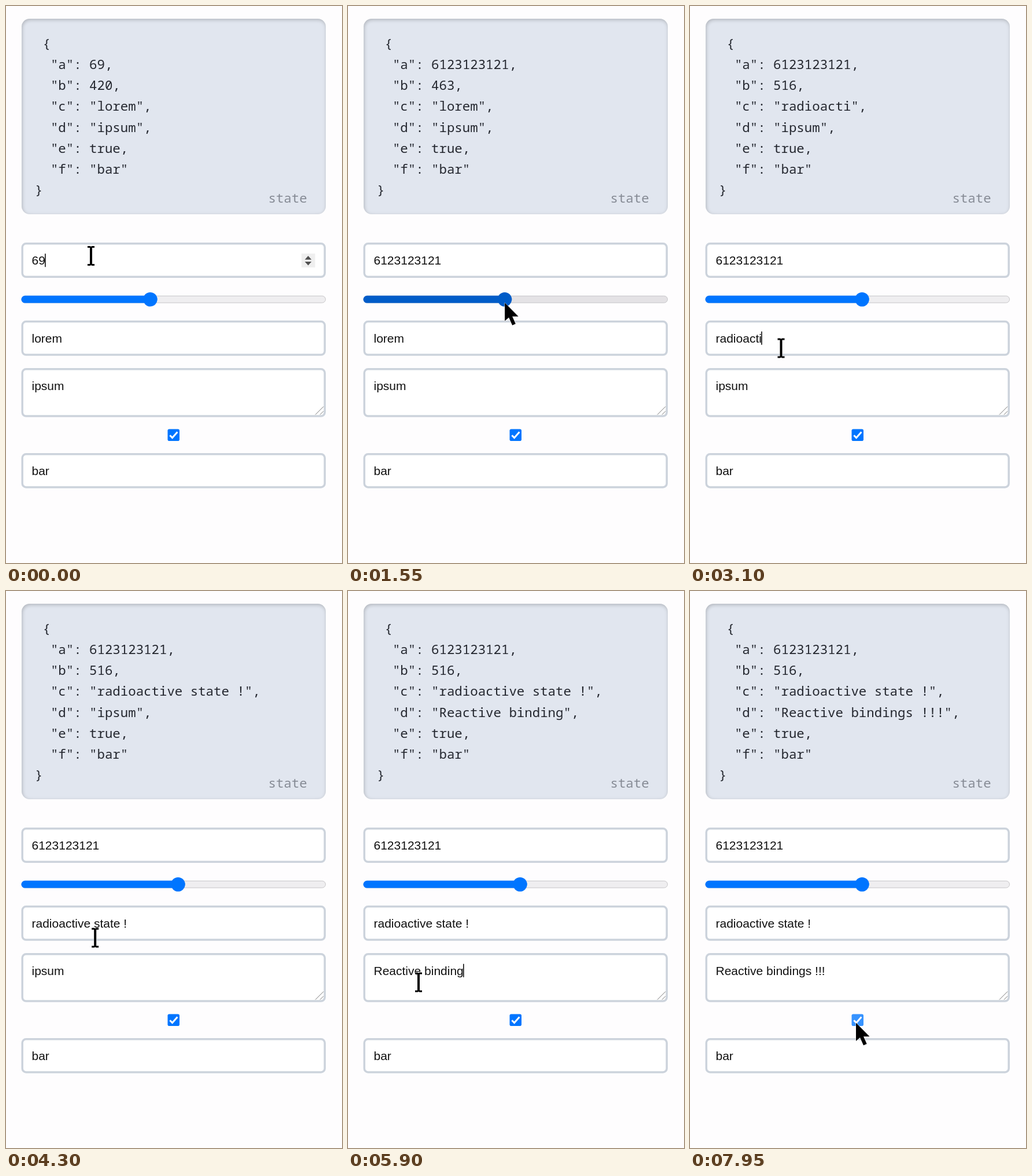
An HTML page for the animation above (8 s loop, 581 by 963 pixels).

```html
<!DOCTYPE html>
<html lang="en">
<head>
<meta charset="utf-8">
<title>Reactive form state</title>
<style>
  html, body { margin: 0; width: 100%; height: 100%; overflow: hidden; background: #fefdfe; }
  #panel {
    position: absolute; left: 26.5px; top: 22px; width: 526.5px; height: 338px;
    border-radius: 14px; background: #e1e6ef;
    box-shadow: inset 1px 2px 6px rgba(0, 0, 0, .22);
  }
  svg { position: absolute; left: 0; top: 0; width: 581px; height: 963px; }
  text { white-space: pre; }
  .code text { font: 22.4px "Noto Sans Mono", "Liberation Mono", monospace; fill: #24272f; }
  .code .label { fill: #868b95; }
  .value text { font: 21px "Liberation Sans", Arial, sans-serif; fill: #111; }
  .box { fill: #fff; stroke: #ccd3dc; stroke-width: 3.5; }
  .cursor { fill: #000; stroke: #fff; stroke-width: 1; paint-order: stroke; }
</style>
</head>
<body>
<div id="panel"></div>
<svg id="stage" viewBox="0 0 581 963">
  <g class="code" id="code"><text class="label" x="453.5" y="340">state</text></g>
  <g id="boxes"></g>
  <g id="spinner">
    <rect x="511" y="428" width="23.5" height="24" fill="#efefef"/>
    <path d="M522.5 432l5.8 6.5h-11.6zM522.5 448.5l5.8-6.5h-11.6z" fill="#505050"/>
  </g>
  <path d="M535 706.5L549 692.5M543 706.5L549 700.5" stroke="#777" fill="none"/>
  <rect id="track" x="27" y="501.3" width="525.5" height="11.8" rx="5.9" stroke="#c6c5c8"/>
  <rect id="filled" x="26.5" y="500.8" height="12.8" rx="6.4"/>
  <circle id="thumb" cy="507.2" r="12.3"/>
  <rect id="check" x="279.5" y="731.5" width="20.5" height="20.5" rx="2.8"/>
  <path d="M283.4 742.3L287.6 746.6L296.4 736.6" fill="none" stroke="#fff" stroke-width="3"/>
  <g class="value" id="values"></g>
  <rect id="caret" width="1.5" height="23" fill="#000"/>
  <path id="arrow" class="cursor" d="M0 0V31.5L7 25.5L13 39L18.7 36.5L13 23.8H23.5Z"/>
  <path id="beam" class="cursor" d="M-6-17h4.5l1.5 1 1.5-1H6v3H2V14H6v3H1.5L0 16l-1.5 1H-6v-3h4V-14h-4z"/>
</svg>
<script>
const LOOP = 8000;
const TEXT_X = 44.5;
const BLUE = '#0075ff', DARK_BLUE = '#005cc8', PRESSED_BLUE = '#3793ff';
const PRESS = 1250, RELEASE = 2060, CHECK_PRESS = 7900;

const $ = id => document.getElementById(id);
const set = (el, attrs) => { for (const k in attrs) el.setAttribute(k, attrs[k]); };
const show = (el, on) => el.setAttribute('visibility', on ? 'visible' : 'hidden');
function add(parent, tag, attrs) {
  const el = document.createElementNS('http://www.w3.org/2000/svg', tag);
  set(el, attrs);
  return parent.appendChild(el);
}

// Input boxes: outline and text baseline
const fields = {
  a: { y: 410.8, h: 57.5, base: 447 },
  c: { y: 545.6, h: 57.5, base: 581.5 },
  d: { y: 627.8, h: 81.3, base: 663.5 },
  f: { y: 774.8, h: 57.2, base: 811 }
};
for (const f of Object.values(fields)) {
  add($('boxes'), 'rect', { class: 'box', x: 28.2, y: f.y, width: 523, height: f.h, rx: 6.5 });
  f.text = add($('values'), 'text', { x: TEXT_X, y: f.base });
}

const lines = ['{', 'a', 'b', 'c', 'd', 'e', 'f', '}'].map((key, i) => {
  const column = key === '{' ? 1 : key === '}' ? 0 : 2;
  const el = add($('code'), 'text', { x: 50 + column * 13.44, y: 73 + i * 36.15 });
  el.textContent = key;
  return { key, el };
});

// Keystrokes: each one stores the field's text from that time on
const strokes = {};
function start(field, text) { strokes[field] = [{ time: 0, text }]; }
const current = field => strokes[field].at(-1).text;
function erase(field, count, time, step) {
  for (let i = 0; i < count; i++)
    strokes[field].push({ time: time + i * step, text: current(field).slice(0, -1) });
}
function type(field, text, time, step) {
  [...text].forEach((ch, i) =>
    strokes[field].push({ time: time + i * step, text: current(field) + ch }));
}
start('a', '69');
start('c', 'lorem');
start('d', 'ipsum');
start('f', 'bar');
erase('a', 1, 100, 0);
type('a', '123123121', 150, 55);
erase('c', 5, 2390, 35);
type('c', 'radioactive ', 2574, 65);
type('c', 'state !', 3400, 58);
erase('d', 5, 4640, 50);
type('d', 'Reactive binding', 4920, 65);
type('d', 's ', 6100, 0);
type('d', '!!!', 6250, 50);

const lastStroke = (field, t) => strokes[field].findLast(s => s.time <= t);

const focus = [
  { field: 'a', from: 0, to: 850 },
  { field: 'c', from: 2350, to: 4520 },
  { field: 'd', from: 4520, to: 7700 }
];

// Pointer path: time, x, y
const path = [
  [0, 147, 432], [850, 147, 432], [1000, 221, 519], [1200, 250, 513], [PRESS, 250, 513],
  [1900, 297.5, 513], [RELEASE, 297.5, 513], [2350, 157.5, 591.5], [4250, 157.5, 591.5],
  [4520, 122, 676.5], [6400, 122, 676.5], [6900, 287, 746.5], [LOOP, 287, 746.5]
];
function pointerAt(t) {
  const i = path.findIndex(p => p[0] > t);
  const [t0, x0, y0] = path[i - 1], [t1, x1, y1] = path[i];
  const u = (t - t0) / (t1 - t0), e = u * u * (3 - 2 * u);
  return { x: x0 + (x1 - x0) * e, y: y0 + (y1 - y0) * e };
}

const pen = document.createElement('canvas').getContext('2d');
function textWidth(text) {
  pen.font = '21px "Liberation Sans", Arial, sans-serif';
  return pen.measureText(text).width;
}

function drawCaret(t) {
  const active = focus.find(f => t >= f.from && t < f.to);
  if (!active) return show($('caret'), false);
  const { time, text } = lastStroke(active.field, t);
  const idle = t - Math.max(time, active.from);
  const steady = active.field === 'a';
  show($('caret'), steady || Math.floor(idle / 500) % 2 === 0);
  set($('caret'), { x: TEXT_X + textWidth(text) - .7, y: fields[active.field].base - 18.8 });
}

function drawSlider(t, value, pointer) {
  const x = 39 + value * .501;
  const dragging = t >= PRESS && t < RELEASE;
  const hover = dragging || Math.abs(pointer.y - 507) < 14;
  const onThumb = dragging || Math.hypot(pointer.x - x, pointer.y - 507) < 12.5;
  set($('track'), { fill: hover ? '#e4e2e5' : '#efeef0' });
  set($('filled'), { width: x - 26.5, fill: hover ? DARK_BLUE : BLUE });
  set($('thumb'), { cx: x, fill: onThumb ? DARK_BLUE : BLUE });
}

function drawPointer({ x, y }) {
  const overField = Object.values(fields).some(f => y > f.y && y < f.y + f.h);
  show($('beam'), overField);
  show($('arrow'), !overField);
  const transform = `translate(${x} ${y})`;
  set($('beam'), { transform });
  set($('arrow'), { transform });
}

function draw(t) {
  const pointer = pointerAt(t);
  const dragX = t < PRESS ? 250 : t < RELEASE ? pointer.x : 297.5;
  const state = { b: Math.round(420 + (dragX - 250) / 47.5 * 96), e: true };
  for (const key in fields) {
    const text = lastStroke(key, t).text;
    fields[key].text.textContent = text;
    state[key] = key === 'a' ? Number(text) : text;
  }
  for (const { key, el } of lines)
    if (key in state)
      el.textContent = `"${key}": ${JSON.stringify(state[key])}${key === 'f' ? '' : ','}`;

  show($('spinner'), t < PRESS);
  drawSlider(t, state.b, pointer);
  const overCheck = pointer.x > 279 && pointer.x < 300 && pointer.y > 731 && pointer.y < 752;
  set($('check'), { fill: t >= CHECK_PRESS ? PRESSED_BLUE : overCheck ? DARK_BLUE : BLUE });
  drawCaret(t);
  drawPointer(pointer);
}

function tick() {
  draw(performance.now() % LOOP);
  requestAnimationFrame(tick);
}
tick();
</script>
</body>
</html>
```
